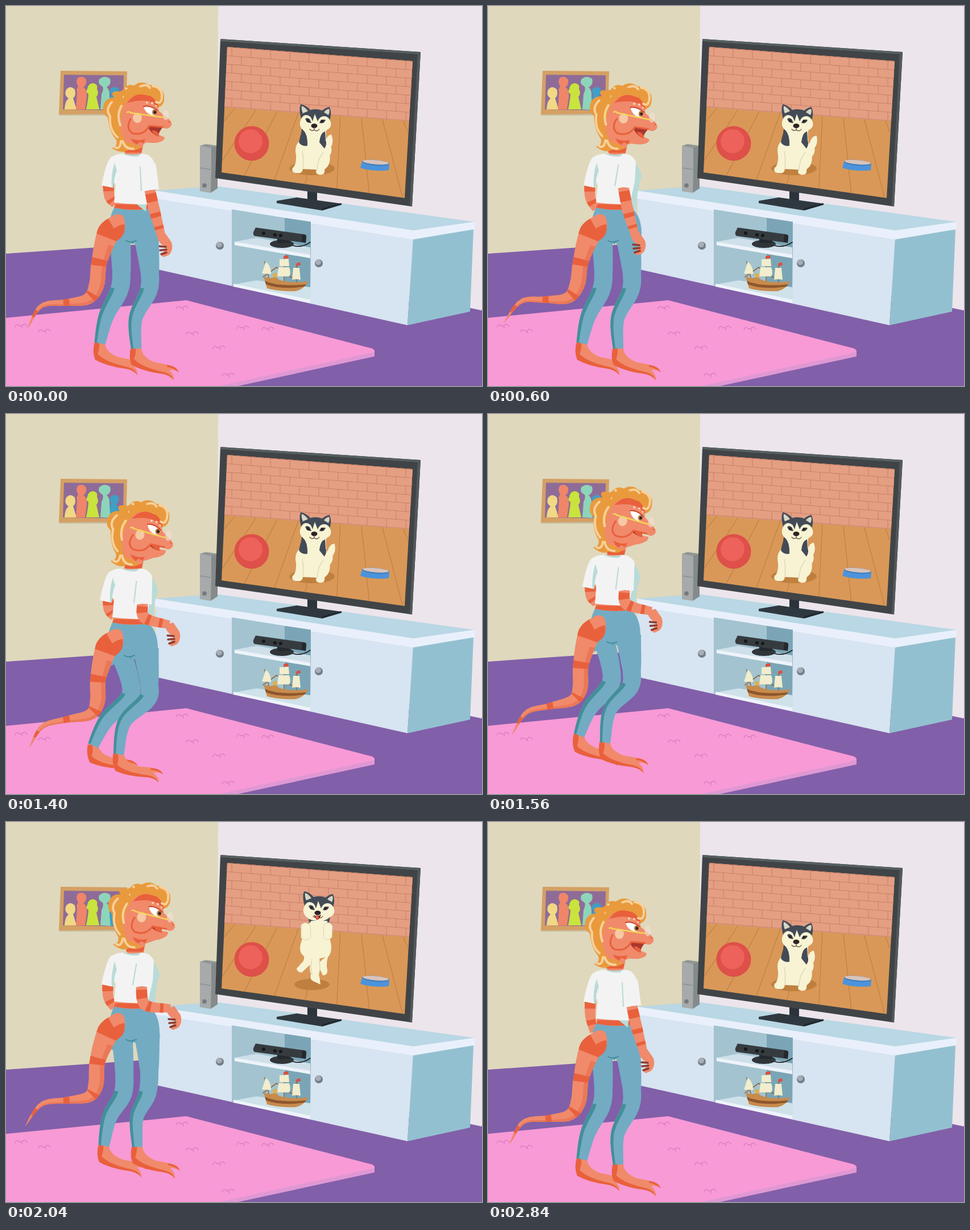
Animation, 837 px wide and 669 px high, one loop 2880 ms. Source, as an HTML page:

```html
<!DOCTYPE html>
<html lang="en">
<head>
<meta charset="utf-8">
<title>Jump along</title>
<style>
  html, body { margin: 0; width: 100%; height: 100%; overflow: hidden; background: #825fa9; }
  svg { display: block; width: 100vw; height: 100vh; }
  .skin { fill: #f08a6b; }
  .mark { fill: #e9603c; }
  .jeans { fill: #73abc3; }
  .seam { fill: #438f99; }
  .shirt { fill: #f3f3f3; }
  .fold { fill: #b9dbd8; }
  .hair { fill: #e99a3d; }
  .cream { fill: #f7f3d3; }
  .coat { fill: #434b57; }
  .line { fill: none; stroke-linecap: round; stroke-linejoin: round; }
</style>
</head>
<body>
<svg viewBox="0 0 837 669" preserveAspectRatio="none">
<defs>
  <pattern id="bricks" width="34" height="30" patternUnits="userSpaceOnUse" patternTransform="matrix(1 .077 0 1 389 72)">
    <path d="M0 .5H34M0 15.5H34M8 0V15M25 15V30" stroke="#cb7d67" stroke-width="1.1" fill="none"/>
  </pattern>
  <clipPath id="screen"><path d="M389 72 715 97 701 338 379 293Z"/></clipPath>
  <path id="tuft" class="line" d="M-11 2Q-8-6-3 1M-3 1Q0-3 2 4M1 1Q5-7 10 1" stroke="#e27fc4" stroke-width="1.6"/>
  <g id="foot">
    <path class="skin" d="M-9-3 9 0Q10 15 32 24L57 29Q71 32 75 42Q66 36 58 38Q67 46 66 56Q59 45 42 43Q12 38-8 28Q-14 15-9-3Z"/>
    <path class="mark" d="M-9-3-1-2Q0 10-4 18Q6 31 42 40Q62 43 66 56Q59 46 42 44Q12 40-8 29Q-14 15-9-3ZM54 29Q71 31 75 42Q67 35 54 32Z"/>
  </g>
  <g id="dogHead">
    <path class="coat" d="M-24 3Q-30-14-26-25Q-17-24-9-15Q2-18 12-14Q19-20 25-20Q30-8 24 6L20 16H-20Z"/>
    <path d="M-22-9Q-25-16-24-22Q-18-20-13-13ZM23-6Q26-12 24-17Q19-16 15-11Z" fill="#d8d6c4"/>
    <path class="cream" d="M-24-1Q-21-6-16-6Q-8-6-5 5L-1-8 4 5Q8-5 17-4Q23-3 26 4Q31 15 19 21Q10 29-2 27Q-16 27-23 19Q-31 10-24-1Z"/>
    <path class="coat" d="M-18 1Q-11-5-7 8Q-14 9-18 1ZM7 8Q11-3 18 3Q15 10 7 8Z"/>
    <path d="M-14-3h5l1 3h-5ZM9-1h6l1 3h-6Z" fill="#fff8dc"/>
    <g fill="#2d2224"><circle cx="-13" cy="4" r="2.6"/><circle cx="12" cy="5" r="2.6"/><ellipse cx="-2" cy="13" rx="5.5" ry="4"/></g>
    <path class="line" d="M-2 16V20M-10 19Q-6 23-2 20Q3 24 7 19" stroke="#5b4038" stroke-width="1.2"/>
  </g>
</defs>

<!-- room -->
<path d="M0 0H837V669H0Z" fill="#825fa9"/>
<path d="M0 0H374V410L0 436Z" fill="#dfd8bc"/>
<path d="M373 0H837V536L371 440Z" fill="#ece5eb"/>
<path d="M648 606V617L408 669H370Z" fill="#df98d4"/>
<path d="M0 549 317 518 644 603Q650 606 645 610L376 669H0Z" fill="#f79ad6"/>
<g id="tufts"></g>
<path d="M93 189H211V193H93Z" fill="#c9c0a4"/>
<path d="M96 114 213 115 211 190 93 191Z" fill="#d4a064"/>
<path d="M102 121 207 122 206 184 100 182Z" fill="#8f6c98"/>
<path d="M103 182Q104 166 110 163Q101 156 106 147Q113 139 121 147Q124 158 118 162L124 182Z" fill="#f1d884"/>
<path d="M123 182 125 152Q123 146 127 142Q121 132 127 126Q136 122 141 130Q142 140 136 143Q143 147 142 160L139 182Z" fill="#ef866a"/>
<path d="M141 182Q145 162 145 155Q139 152 143 146Q145 135 154 136Q162 138 160 146Q164 154 159 160L164 182Z" fill="#c9e43c"/>
<path d="M166 182 168 155Q172 147 170 142Q160 137 164 129Q173 121 183 128Q186 138 177 143Q183 148 182 160L184 183Z" fill="#8dd5ba"/>
<path d="M184 183 182 162 185 158Q180 148 186 144Q196 140 199 148Q197 158 193 159Q202 167 201 184Z" fill="#409fc5"/>

<!-- cabinet -->
<path d="M262 325 370 317 824 380 716 397Z" fill="#b9d7e4"/>
<path d="M263 336 716 408 706 562 263 463Z" fill="#d7e4f1"/>
<path d="M716 408 822 393 816 538 706 562Z" fill="#93c0d0"/>
<path d="M262 325 716 395 824 380V393L716 411 262 339Z" fill="#e9f0fb"/>
<path d="M397 358 536 380 535 522 397 493Z" fill="#a3c3d0"/>
<path d="M490 373 536 380 535 500 490 488Z" fill="#7ba5b6"/>
<path d="M402 415 440 408 535 425V441Z" fill="#cfe0ea"/>
<path d="M402 415 535 438V444L402 421Z" fill="#eef3fb"/>
<path d="M402 490 440 483 535 495V518Z" fill="#cfe2e9"/>
<path d="M400 489 535 517V523L400 494Z" fill="#eef3fb"/>
<g fill="#737d87"><circle cx="376" cy="422" r="7"/><circle cx="550" cy="453" r="7"/></g>
<g fill="#a5adb5"><circle cx="375" cy="420" r="5"/><circle cx="549" cy="451" r="5"/></g>
<path class="line" d="M500 420Q517 428 535 416" stroke="#24282c" stroke-width="1.8"/>
<ellipse cx="485" cy="419" rx="21" ry="7" fill="#30353a"/>
<path d="M477 405H500V417H477Z" fill="#24292d"/>
<path d="M439 390 525 402Q529 403 528 408L527 417 438 405Q434 404 435 398Z" fill="#363b40"/>
<path d="M521 402 528 404 527 417 520 415Z" fill="#24282c"/>
<g fill="#15191c"><circle cx="453" cy="400" r="3"/><circle cx="473" cy="403" r="3"/><circle cx="483" cy="404" r="3"/></g>
<path class="line" d="M462 478 455 450M489 485V441M511 487V454M452 477 476 460 505 480" stroke="#8c6a43" stroke-width="1.6"/>
<path d="M457 450Q467 459 466 472L450 471ZM481 446 497 445 498 458H481ZM479 460H498Q502 471 498 476H477ZM505 461H516L518 482Q510 480 503 482Z" fill="#f1edcd"/>
<path d="M489 440 496 439 497 444 489 445ZM511 453 517 451 518 456 511 458Z" fill="#e24c3b"/>
<path d="M453 476Q466 482 474 476L480 482Q507 490 531 484Q525 498 510 502Q478 503 459 497Z" fill="#c88b4c"/>
<path d="M455 484Q480 495 528 490L525 494Q482 500 457 490Z" fill="#8e562d"/>
<circle cx="473" cy="474" r="4" fill="#deb04b"/>

<!-- console -->
<path d="M341 246 351 243 372 246 361 251Z" fill="#8f9694"/>
<path d="M341 246 361 250 360 329 341 326Z" fill="#a6aaab"/>
<path d="M361 250 372 246V321L360 329Z" fill="#858a8b"/>
<path d="M341 285 360 288" stroke="#7e8385"/><circle cx="349" cy="316" r="3.8" fill="#74797c"/>

<!-- television -->
<path d="M530 325 547 328V350H530Z" fill="#2c333a"/>
<path d="M476 343 511 337 590 348 556 357V360L476 347Z" fill="#30383f"/>
<path d="M556 356 590 347V350L556 360Z" fill="#20272d"/>
<path d="M377 58 729 81 714 353 368 303Z" fill="#404447"/>
<path d="M377 58 729 81V85L377 62Z" fill="#566060"/>
<path d="M724 81H729L714 353 710 352Z" fill="#53595b"/>
<g clip-path="url(#screen)">
  <path d="M375 65H720V345H375Z" fill="#d99858"/>
  <path id="planks" class="line" stroke="#bb7e42" stroke-width="1.1"/>
  <path id="wall" d="M380 60H720V204L380 178Z" fill="#e49f83"/>
  <path d="M380 60H720V204L380 178Z" fill="url(#bricks)"/>
  <circle cx="432" cy="242" r="30.5" fill="#de5049"/><circle cx="430" cy="238" r="21" fill="#ed625a"/>
  <path d="M626 275 623 285Q645 292 673 289L674 279Z" fill="#4c93dc"/>
  <ellipse cx="650" cy="276" rx="24" ry="5" transform="rotate(5 650 276)" fill="#3d7dbf"/>
  <ellipse cx="650" cy="275" rx="23" ry="3.8" transform="rotate(5 650 275)" fill="#d8c3ba"/>
  <ellipse id="shadow" cx="538" cy="286" fill="#bf803f"/>
  <g id="sit">
    <path id="wag" class="cream" d="M560 270Q576 264 573 249Q579 240 575 227Q566 228 564 240L556 254Z"/>
    <path class="cream" d="M521 219H563Q561 238 567 250Q573 270 566 282L560 288Q562 298 551 297Q543 296 546 288L522 287Q521 296 511 294Q501 294 504 285Q511 280 510 262Q506 246 518 235Z"/>
    <path class="coat" d="M520 216Q531 224 530 246Q520 248 515 240Q517 230 519 224ZM561 218Q552 226 551 240L560 251Q565 244 562 236Z"/>
    <path class="line" d="M522 286Q524 270 521 256M547 288Q548 268 558 258" stroke="#dcd7b4" stroke-width="1.3"/>
    <use href="#dogHead" x="544" y="198"/>
  </g>
  <g id="leap">
    <path class="coat" d="M530 162 571 164 566 184 535 184Z"/>
    <path class="cream" d="M537 174H565Q566 190 570 208Q575 224 568 236L554 240 527 238Q514 232 518 215Q523 196 530 182Z"/>
    <path class="cream" d="M522 232Q528 242 518 250L511 258Q512 265 520 265L536 250 540 236ZM568 232Q562 248 565 260Q566 270 557 270L548 250Z"/>
    <path class="cream" d="M537 238Q532 258 536 268Q533 278 542 281L553 286Q552 276 550 268Q554 250 551 238Z"/>
    <path class="line" d="M538 241Q535 258 538 268M550 242Q554 256 550 268" stroke="#dcd7b4" stroke-width="1.3"/>
    <path class="cream" stroke="#dcd7b4" d="M519 181Q528 173 535 183L536 203Q528 212 519 204ZM558 182Q567 172 574 183L573 203Q564 212 559 203Z"/>
    <use href="#dogHead" x="550" y="147"/>
    <path d="M541 163Q547 168 554 163Q551 173 546 172Z" fill="#5b2521"/><ellipse cx="547" cy="168" rx="3" ry="3.5" fill="#e8584f"/>
  </g>
</g>

<!-- viewer -->
<path id="armL" class="skin"/><path id="armLMarks" class="mark"/>
<use id="footL" href="#foot"/><path id="legL" class="jeans"/><path id="legLSeam" class="seam"/>
<use id="footR" href="#foot"/><path id="legR" class="jeans"/><path id="legRSeam" class="seam"/>
<g class="root">
  <path class="skin" d="M192 343H251V360H190Z"/>
  <path class="mark" d="M193 349 251 350V357Q220 361 190 355Z"/>
  <path class="jeans" d="M190 355Q220 362 254 357Q271 372 270 405L264 432 225 418H216L186 432Q173 390 190 355Z"/>
  <path class="line" d="M211 413Q218 418 229 413M222 415V418" stroke="#438f99" stroke-width="2"/>
</g>
<path id="tail" class="skin"/><path id="tailShade" fill="#ea7858"/><path id="tailMarks" class="mark"/>
<g class="root">
  <path class="skin" d="M180 375Q195 361 206 370Q212 382 208 395L196 403Z"/>
  <path class="mark" d="M208 384Q212 405 193 414L181 404Q189 387 208 384Z"/>
</g>
<g id="neck"><path class="skin" d="M209 230H245L237 264H210Z"/><path class="mark" d="M208 248Q225 256 240 249L238 258H208Z"/></g>
<g class="root">
  <path id="chest" class="fold" d="M245 268Q266 276 270 299Q265 315 263 330L260 362 245 350Z"/>
  <path class="shirt" d="M184 267Q195 259 206 260Q222 265 238 260Q254 260 260 274L258 310 249 349Q220 350 190 346L193 315 184 300Z"/>
  <path class="shirt" d="M186 265Q177 270 168 316L188 320Q188 300 196 280Z"/>
  <path class="fold" d="M191 276Q184 298 186 320L189 320Q190 300 195 290ZM204 259Q220 264 238 260L232 265Q214 266 204 259Z"/>
</g>
<g id="head">
  <g id="jaw">
    <path class="skin" d="M226 216 250 210Q262 226 279 231Q279 239 262 241Q240 241 226 236Z"/>
    <path d="M246 209 276 213Q268 222 268 230Q255 225 246 209Z" fill="#a8382d"/>
    <path d="M256 219Q264 218 269 225L268 230Q260 227 256 219Z" fill="#e9603c"/>
  </g>
  <path class="hair" d="M190 161Q182 151 194 150Q202 152 206 147Q213 136 225 140Q238 130 252 139Q270 139 277 153Q282 176 265 179L212 190Q204 216 216 236Q226 248 238 247Q230 257 216 253Q204 262 186 250Q197 248 194 236Q181 221 179 196Q167 190 172 172Q177 161 190 161Z"/>
  <path class="skin" d="M208 175Q220 152 243 154Q264 159 269 185L282 196Q293 203 291 210Q285 220 274 213L251 211Q251 224 259 235L244 242 212 241Q192 216 208 175Z"/>
  <path class="mark" d="M213 171Q227 150 248 156Q264 161 269 179Q251 159 213 171ZM219 233Q234 239 245 234L242 242 235 239 230 244 224 240Z"/>
  <path class="line" d="M219 199Q210 216 222 224Q242 229 252 211L276 213" stroke="#e9603c" stroke-width="3"/>
  <g class="line" stroke="#f8d09b" stroke-width="4">
    <path d="M211 145Q219 151 207 160M236 142Q247 136 253 144M258 141Q275 143 274 160Q273 174 264 169M186 169Q174 183 183 194Q181 218 196 231M203 176Q194 192 201 210M202 238Q201 253 192 249M205 238Q210 253 224 251"/>
  </g>
  <path class="hair" d="M207 157Q211 140 229 145Q247 138 256 152Q268 151 273 165Q265 157 250 158Q228 149 207 171Z"/>
  <path d="M242 178Q253 173 265 184L262 193Q247 193 242 178Z" fill="#fff"/>
  <ellipse cx="261" cy="187" rx="4" ry="5" fill="#b87335"/><circle cx="262" cy="187" r="2.5" fill="#2d2120"/>
  <path class="line" d="M242 177Q254 174 266 184" stroke="#c94329" stroke-width="2"/>
  <g fill="#f9d5b7"><circle cx="248" cy="170" r="2"/><circle cx="257" cy="171" r="2"/><circle cx="264" cy="176" r="1.6"/></g>
  <ellipse cx="231" cy="197" rx="8" ry="9" fill="#f6c8a4"/>
  <ellipse cx="281" cy="192" rx="5.5" ry="9" fill="#f6ded3" opacity=".65"/>
  <path class="line" d="M213 187Q217 185 219 188L268 195 277 196" stroke="#f3d658" stroke-width="2.5"/>
  <circle cx="287" cy="204" r="1.5" fill="#e9603c"/>
</g>
<path id="armR" class="skin"/><path id="armRMarks" class="mark"/>
<g id="hand">
  <path class="skin" d="M-8 1 7-4 18 12Q22 25 14 34L5 38Q-4 35 4 29L8 20Q-4 16-8 1Z"/>
  <path class="line" d="M8 20-3 19M9 25-2 26M9 30 0 33" stroke="#8d3d30" stroke-width="3.5"/>
</g>
<path id="sleeve" class="shirt"/><path id="sleeveFold" class="fold"/>
</svg>
<script>
const LOOP = 2880, STEP = 40;
const $ = id => document.getElementById(id);
const draw = (id, ...shapes) => $(id).setAttribute('d', shapes.join(''));
const place = (id, value) => $(id).setAttribute('transform', value);
const mix = (a, b, k) => Array.isArray(a) ? a.map((v, i) => mix(v, b[i], k)) : a + (b - a) * k;
const ease = {
  smooth: k => k * k * (3 - 2 * k),
  out: k => 1 - (1 - k) ** 2,
  fall: k => k * k,
  even: k => k
};

$('tufts').innerHTML = [[27, 563], [68, 572], [310, 531], [328, 576], [417, 566], [461, 568], [375, 601], [391, 649]]
  .map(([x, y]) => `<use href="#tuft" x="${x}" y="${y}"/>`).join('');
draw('planks', ...Array.from({ length: 9 }, (_, i) => {
  const x = 403 + 37 * i, y = 179 + 3 * i;
  return `M${x} ${y}L${600 + (x - 600) * 1.58} ${y + 140}`;
}));

// Spline through flat x, y points; returns position, unit normal and half width.
function spine(flat, widths) {
  const n = flat.length / 2 - 1;
  const at = (i, axis) => flat[2 * Math.max(0, Math.min(n, i)) + axis];
  const coord = (u, axis) => {
    const i = Math.min(n - 1, Math.floor(u * n)), k = u * n - i;
    const [a, b, c, d] = [-1, 0, 1, 2].map(o => at(i + o, axis));
    return b + k * ((c - a) + k * ((2 * a - 5 * b + 4 * c - d) + k * (3 * b - a - 3 * c + d))) / 2;
  };
  return u => {
    const lo = Math.max(0, u - .01), hi = Math.min(1, u + .01);
    const dx = coord(hi, 0) - coord(lo, 0), dy = coord(hi, 1) - coord(lo, 1), len = Math.hypot(dx, dy) || 1;
    const i = Math.min(n - 1, Math.floor(u * n));
    return { x: coord(u, 0), y: coord(u, 1), nx: -dy / len, ny: dx / len, half: mix(widths[i], widths[i + 1], u * n - i) / 2 };
  };
}

// Strip of a spine from a to b, between two sides (-1 right or low, 1 left or high).
function ribbon(line, a = 0, b = 1, low = -1, high = 1) {
  const count = Math.ceil(4 + 28 * (b - a)), near = [], far = [];
  for (let i = 0; i <= count; i++) {
    const p = line(mix(a, b, i / count));
    const edge = side => `${(p.x + p.nx * p.half * side).toFixed(1)} ${(p.y + p.ny * p.half * side).toFixed(1)}`;
    near.push(edge(low));
    far.unshift(edge(high));
  }
  return `M${near.concat(far).join('L')}Z`;
}

// Limbs run from body to tip; root and head are offsets from the idle stance.
const idle = {
  root: [0, 0], head: [0, 0, 0], jaw: 0, turn: 0, feet: [0, 0],
  tail: [164, 450, 159, 492, 143, 516, 105, 522, 62, 528, 38, 567],
  legL: [200, 400, 203, 470, 198, 503, 176, 547, 165, 594],
  legR: [246, 400, 253, 470, 250, 503, 228, 550, 229, 603],
  armL: [180, 312, 182, 336, 192, 350],
  armR: [249, 278, 253, 324, 261, 360, 273, 404]
};
const rest = { ...idle, armL: [180, 312, 180, 342, 186, 370] };
const turned = {
  ...idle, head: [7, 1, 4], turn: 1, armL: [179, 312, 180, 338, 190, 358],
  tail: [163, 450, 157, 490, 140, 514, 100, 517, 58, 520, 28, 558],
  armR: [243, 278, 238, 319, 246, 360, 258, 401]
};
const crouch = {
  ...turned, root: [-3, 12], head: [4, 16, 8], jaw: 1, feet: [-5, -5],
  tail: [162, 465, 161, 505, 148, 529, 105, 538, 64, 550, 41, 587],
  legL: [202, 420, 218, 470, 216, 500, 176, 540, 153, 584],
  legR: [246, 415, 252, 475, 248, 503, 208, 543, 198, 599],
  armL: [180, 326, 181, 345, 190, 358],
  armR: [243, 292, 240, 334, 244, 359, 287, 371]
};
const air = {
  ...crouch, root: [2, -126], head: [11, -122, 8], feet: [14, 13],
  tail: [170, 326, 167, 370, 155, 386, 120, 402, 82, 408, 52, 453],
  legL: [208, 273, 207, 336, 203, 375, 191, 421, 193, 479],
  legR: [249, 276, 256, 341, 252, 381, 242, 421, 243, 481],
  armL: [180, 186, 182, 208, 193, 222],
  armR: [243, 154, 239, 196, 245, 222, 290, 233]
};
const descend = {
  ...air, root: [0, -30], head: [7, -29, 6], feet: [0, 0],
  tail: [161, 420, 158, 462, 145, 484, 105, 490, 62, 497, 34, 535],
  legL: [204, 375, 208, 440, 205, 480, 182, 520, 172, 570],
  legR: [248, 375, 252, 440, 248, 480, 230, 520, 231, 572],
  armL: [179, 283, 180, 309, 190, 328],
  armR: [243, 248, 238, 289, 245, 322, 289, 328]
};
const land = {
  ...idle, root: [0, 2], head: [5, 2, 4], jaw: .7, turn: 1, armL: turned.armL,
  tail: [160, 450, 156, 490, 140, 512, 98, 512, 48, 492, 19, 525],
  armR: [243, 278, 239, 321, 245, 354, 289, 366]
};
const ready = {
  ...idle, head: [2, 0, 1], turn: .9, armL: turned.armL,
  armR: [244, 278, 243, 322, 251, 351, 300, 382]
};
const keys = [
  [0, idle], [600, turned], [1120, turned], [1400, crouch], [1540, crouch], [1760, air, 'out'],
  [2040, descend, 'fall'], [2100, land, 'even'], [2280, ready], [2840, rest], [LOOP, idle]
];

function poseAt(t) {
  const i = keys.findIndex(key => key[0] > t);
  const [from, a] = keys[i - 1], [to, b, curve = 'smooth'] = keys[i];
  const k = ease[curve]((t - from) / (to - from));
  return Object.fromEntries(Object.keys(a).map(name => [name, mix(a[name], b[name], k)]));
}

function drawLeg(side, points, widths, turn) {
  const line = spine(points, widths);
  draw('leg' + side, ribbon(line));
  draw(`leg${side}Seam`, ribbon(line, .48, 1, .55, 1));
  place('foot' + side, `translate(${points[8]} ${points[9]}) rotate(${turn})`);
}

function drawViewer(p) {
  const [x, y] = p.root;
  document.querySelectorAll('.root').forEach(g => g.setAttribute('transform', `translate(${x} ${y})`));
  place('chest', `translate(${(p.turn - 1) * 14} 0)`);

  const tail = spine([197 + x, 385 + y, 180 + x, 400 + y, ...p.tail], [32, 40, 27, 27, 20, 11, 8, .5]);
  draw('tail', ribbon(tail));
  draw('tailShade', ribbon(tail, .2, 1, -1, -.45));
  draw('tailMarks', ribbon(tail, .05, .17), ...[.29, .52, .71, .91].map(u => ribbon(tail, u - .018, u + .018)));

  drawLeg('L', p.legL, [38, 32, 32, 27, 19], p.feet[0]);
  drawLeg('R', p.legR, [46, 32, 31, 24, 18], p.feet[1]);

  const left = spine(p.armL, [20, 18, 13]);
  draw('armL', ribbon(left));
  draw('armLMarks', ribbon(left, .1, .3), ribbon(left, .6, .74));

  const right = spine(p.armR.slice(2), [19, 20, 14]);
  draw('armR', ribbon(right));
  draw('armRMarks', ribbon(right, .12, .32), ribbon(right, .55, .63), ribbon(right, .78, .84));
  place('hand', `translate(${p.armR[6]} ${p.armR[7]})`);
  const sleeve = spine(p.armR.slice(0, 4), [28, 33]);
  draw('sleeve', ribbon(sleeve));
  draw('sleeveFold', ribbon(sleeve, .1, 1, .86, 1));

  const [hx, hy, angle] = p.head;
  place('neck', `translate(${(hx + x) / 2} ${(hy + y) / 2})`);
  place('head', `translate(${hx} ${hy}) rotate(${angle} 235 200)`);
  place('jaw', `rotate(${-17 * p.jaw} 236 222)`);
}

function drawDog(t) {
  const lift = Math.max(0, 36 * (1 - ((t - 2300) / 260) ** 2));
  const leaping = t >= 2000 && t < 2600;
  $('sit').style.display = leaping ? 'none' : '';
  $('leap').style.display = leaping ? '' : 'none';
  place('leap', `translate(${lift / 18} ${-lift})`);
  place('wag', `rotate(${-4 * Math.cos(t * Math.PI / 200)} 560 268)`);
  $('shadow').setAttribute('rx', leaping ? 31 - lift / 4 : 40);
  $('shadow').setAttribute('ry', leaping ? 10 - lift / 12 : 12);
}

const start = performance.now();
function frame() {
  const t = Math.floor((performance.now() - start) % LOOP / STEP) * STEP;
  drawViewer(poseAt(t));
  drawDog(t);
  requestAnimationFrame(frame);
}
frame();
</script>
</body>
</html>
```
